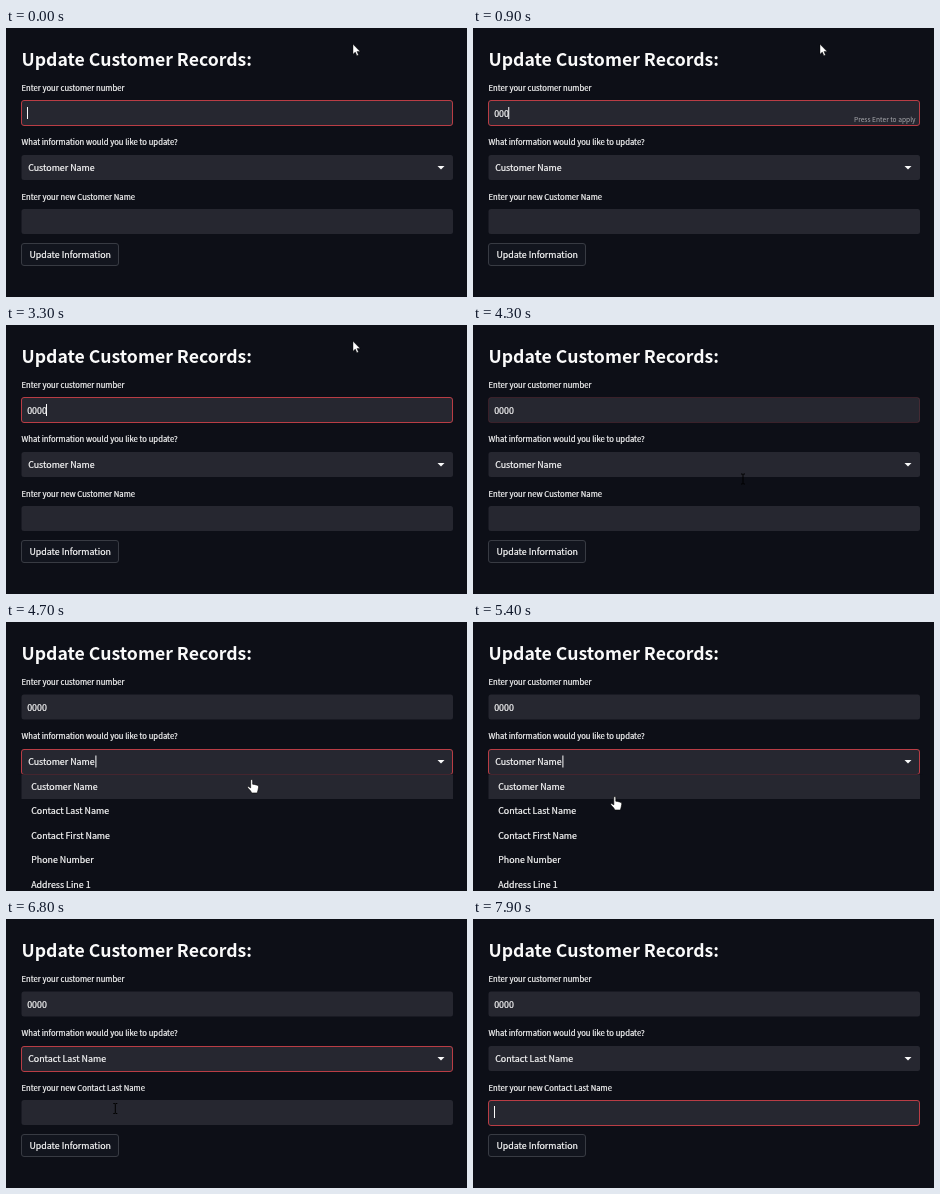
An HTML page that plays this animation: 461x269 px, repeating every 8000 ms.

```html
<!DOCTYPE html>
<html lang="en">
<head>
<meta charset="utf-8">
<title>Update Customer Records</title>
<style>
  html, body { margin: 0; width: 100%; height: 100%; overflow: hidden; background: #0d0f17; }
  svg { display: block; width: 461px; height: 269px; }
  text { font-family: "Noto Sans CJK JP", "Noto Sans CJK SC", "Noto Sans CJK", "Noto Sans", sans-serif; font-size: 8.87px; fill: #fafafa; stroke: #fafafa; stroke-width: .22px; white-space: pre; }
  .title { font-size: 17.65px; font-weight: 700; stroke: none; }
  .label { font-size: 7.7px; }
  .hint { font-size: 6.66px; fill: #a9aaae; stroke: none; text-anchor: end; }
  .field { fill: #262730; }
  .ring { fill: none; stroke: #b93d45; }
  .caret { fill: #fafafa; }
</style>
</head>
<body>
<svg id="stage" viewBox="0 0 461 269"></svg>
<script>
const LOOP = 8000;
const BLINK = 530;
const NS = 'http://www.w3.org/2000/svg';
const stage = document.getElementById('stage');

function add(tag, attrs, parent = stage) {
  const el = document.createElementNS(NS, tag);
  for (const key in attrs) el.setAttribute(key, attrs[key]);
  parent.appendChild(el);
  return el;
}
function text(x, y, value, cls = '', parent = stage) {
  const el = add('text', { x, y, class: cls }, parent);
  el.textContent = value;
  return el;
}
function field(y) {
  add('rect', { x: 15.5, y, width: 431.5, height: 25, rx: 2.5, class: 'field' });
  return add('rect', { x: 15.5, y: Math.floor(y) + .5, width: 431, height: 25, rx: 2.5, class: 'ring' });
}
const caret = (x, y) => add('rect', { x, y, width: 1, height: 12, class: 'caret' });

add('rect', { width: 461, height: 269, fill: '#0d0f17' });
text(15.5, 38, 'Update Customer Records:', 'title');

text(15.5, 63.4, 'Enter your customer number', 'label');
const numberRing = field(72.5);
const number = text(21.2, 88.7, '');
const hint = text(442.5, 94, 'Press Enter to apply', 'hint');
const numberCaret = caret(21, 79);

text(15.5, 117.4, 'What information would you like to update?', 'label');
const selectRing = field(127);
const choice = text(22.2, 143.1, '');
add('path', { d: 'M431.5 138h7l-3.5 3.5z', fill: '#fafafa' });
const selectCaret = caret(89.4, 133.5);

const valueLabel = text(15.5, 172, '', 'label');
const valueRing = field(181);
const valueCaret = caret(21, 187);
add('rect', { x: 15.5, y: 215.5, width: 97, height: 22, rx: 2.5, fill: '#12151e', stroke: '#383b43' });
text(23.4, 229.9, 'Update Information');

const menu = add('g', {});
add('rect', { x: 12, y: 152.5, width: 438, height: 116.5, fill: '#0d0f17' }, menu);
const hover = add('rect', { x: 15.5, width: 431.5, height: 24.5, class: 'field' }, menu);
['Customer Name', 'Contact Last Name', 'Contact First Name', 'Phone Number', 'Address Line 1']
  .forEach((item, i) => text(25.2, 167.7 + i * 24.5, item, '', menu));

const pointers = {
  arrow: add('path', { d: 'M0 0v10l2.3-2.1 1.6 3.6 1.6-.7-1.6-3.5h3.2z', fill: '#fff', stroke: '#000', 'stroke-width': .4 }),
  beam: add('path', { d: 'M-2-5h1.5l.5.6.5-.6H2M0-4.4v8.8M-2 5h1.5l.5-.6.5.6H2', fill: 'none', stroke: '#000' }),
  hand: add('path', {
    d: 'M-1 0q1-1 2 0v4.2l1.8.3 1.8.4 1.6.6q.9.4.8 1.6L6.4 10 5.6 13H0l-1-2-3-3.2q-.4-1.3 1-1.2l2 1.3z',
    fill: '#fff', stroke: '#000', 'stroke-width': .6
  })
};

// Pointer stops: time, x, y
const path = [[0, 347, 16.2], [3420, 347, 16.2], [4200, 270, 154], [4450, 270, 154],
  [5350, 141.8, 175], [5520, 141.8, 175], [5950, 109.3, 189.5], [LOOP, 109.3, 189.5]];
const ease = p => p * p * (3 - 2 * p);
const clamp = p => Math.max(0, Math.min(1, p));

function pointerAt(t) {
  const i = path.findIndex(stop => stop[0] > t);
  const [t0, x0, y0] = path[i - 1], [t1, x1, y1] = path[i];
  const p = ease((t - t0) / (t1 - t0));
  return [x0 + (x1 - x0) * p, y0 + (y1 - y0) * p];
}

const typed = [500, 700, 900, 1100];
const submit = 2400, blur = 4150, open = 4330, pick = 6250, relabel = 6600, focus = 6820;

const show = (el, on) => el.setAttribute('visibility', on ? 'visible' : 'hidden');
const blink = (t, since) => t >= since && Math.floor((t - since) / BLINK) % 2 === 0;
const ramp = (t, start) => clamp((t - start) / 190);

function render(t) {
  const count = typed.filter(k => k <= t).length;
  const lastKey = count ? typed[count - 1] : 0;
  number.textContent = '0'.repeat(count);
  numberCaret.setAttribute('x', 21 + count * 4.75);
  show(numberCaret, t < blur && blink(t, lastKey));
  show(hint, count > 0 && t < submit);
  numberRing.setAttribute('opacity', 1 - ramp(t, blur));

  const opened = t >= open && t < pick;
  show(menu, opened);
  show(selectCaret, opened && blink(t, open));
  selectRing.setAttribute('opacity', ramp(t, open) - ramp(t, focus));
  choice.textContent = t < pick ? 'Customer Name' : 'Contact Last Name';

  valueLabel.textContent = 'Enter your new ' + (t < relabel ? 'Customer Name' : 'Contact Last Name');
  valueRing.setAttribute('opacity', ramp(t, focus));
  show(valueCaret, blink(t, focus));

  const [x, y] = pointerAt(t);
  hover.setAttribute('y', y < 177 ? 152.5 : 176.7);
  const overInput = y > 72 && y < 98;
  const kind = t >= pick ? (t < focus + 300 ? 'beam' : '')
    : opened && y > 156 ? 'hand'
    : overInput || y > 126 ? 'beam' : 'arrow';
  for (const name in pointers) {
    show(pointers[name], name === kind);
    pointers[name].setAttribute('transform', `translate(${x} ${y})`);
  }
}

function frame() {
  render(performance.now() % LOOP);
  requestAnimationFrame(frame);
}
frame();
</script>
</body>
</html>
```
